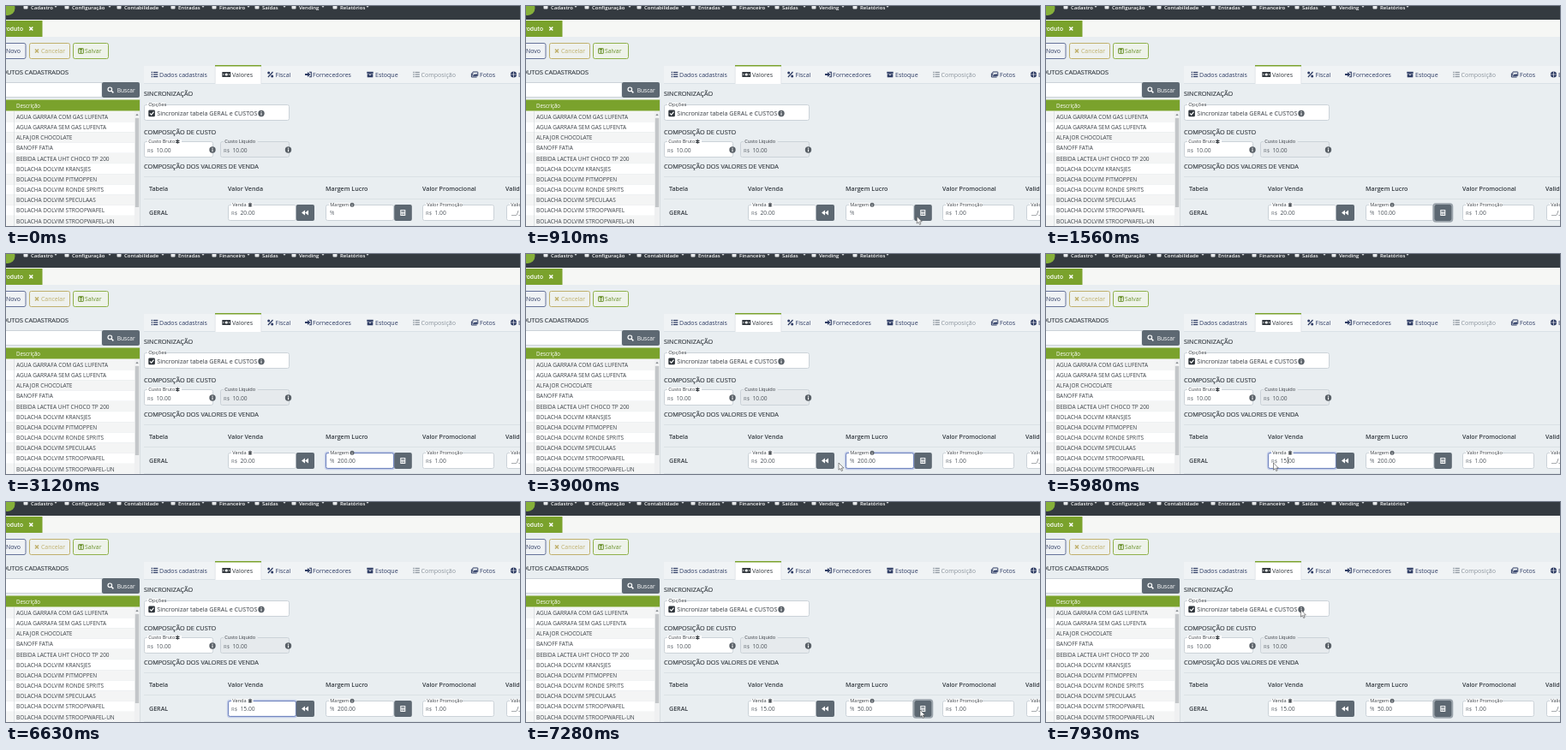
Write an HTML page that moves like this. It is 600x257 px and loops after 8000 ms.

```html
<!DOCTYPE html>
<html lang="pt">
<head>
<meta charset="utf-8">
<title>Cadastro de produto</title>
<style>
  html, body { margin: 0; width: 100%; height: 100%; overflow: hidden; background: #e9eef1; }
  svg { display: block; width: 100vw; height: 100vh; }
  text { font-family: "Open Sans", "Noto Sans", sans-serif; white-space: pre; }
</style>
</head>
<body>
<svg id="stage" viewBox="0 0 600 257"></svg>
<script>
const stage = document.getElementById('stage');
const INK = '#343a40', NAVY = '#2d3b63', GREEN = '#7aa22c', GOLD = '#bfb06c',
      SLATE = '#5d6872', EDGE = '#cbd2d8', WHITE = '#fff', MUTED = '#8b949d', NOTE = '#596067';

const rect = (x, y, w, h, fill, stroke = 'none', r = 0, extra = '') =>
  `<rect x="${x}" y="${y}" width="${w}" height="${h}" rx="${r}" fill="${fill}" stroke="${stroke}" ${extra}/>`;
const text = (x, y, size, str, fill = INK, weight = 400, extra = '') =>
  `<text x="${x}" y="${y}" font-size="${size}" font-weight="${weight}" fill="${fill}" ${extra}>${str}</text>`;
const path = (d, fill, stroke = 'none', width = 1) =>
  `<path d="${d}" fill="${fill}" stroke="${stroke}" stroke-width="${width}"/>`;
const line = (d, stroke, width = 1) => path(d, 'none', stroke, width);
const circle = (x, y, r, fill) => `<circle cx="${x}" cy="${y}" r="${r}" fill="${fill}"/>`;
const heading = (x, y, str, extra = '') =>
  text(x, y, 7.3, str, INK, 500, `stroke="${INK}" stroke-width=".15" ${extra}`);

// Icons are placed by their centre.
const icons = {
  list: (x, y, c) => [-2.5, 0, 2.5].map(d =>
    rect(x - 3.8, y + d - .7, 1.4, 1.4, c) + rect(x - 1.5, y + d - .6, 5.3, 1.2, c)).join(''),
  bill: (x, y, c) => rect(x - 5, y - 3, 10, 6, c, 'none', .6) + circle(x, y, 1.6, WHITE) +
    rect(x - 4, y - .6, 1.2, 1.2, WHITE) + rect(x + 2.8, y - .6, 1.2, 1.2, WHITE),
  percent: (x, y, c) => line(`M${x - 2.8} ${y + 3}L${x + 2.8} ${y - 3}`, c, 1.2) +
    circle(x - 2, y - 2, 1.5, c) + circle(x + 2, y + 2, 1.5, c),
  enter: (x, y, c) => path(`M${x - 4} ${y - 1}h3v-2l3.3 3l-3.3 3v-2h-3z`, c) +
    line(`M${x + 1} ${y - 2.8}h2.3v5.6h-2.3`, c, 1.1),
  box: (x, y, c) => rect(x - 3.7, y - 3.2, 7.4, 2, c) + rect(x - 3.3, y - .7, 6.6, 4, c) +
    rect(x - 1.2, y + .1, 2.4, .8, WHITE),
  photos: (x, y, c) => line(`M${x - 3.6} ${y - 1.5}v4.5h6.2`, c, 1) +
    rect(x - 2.2, y - 3, 6, 4.7, 'none', c, .4) + path(`M${x - 1.6} ${y + 1.2}l1.8 -2l1 1l1 -1.5l1.2 2.5z`, c),
  globe: (x, y, c) => circle(x, y, 3.6, c) +
    line(`M${x - 3.4} ${y}h6.8M${x} ${y - 3.4}v6.8`, WHITE, .6),
  cross: (x, y, c) => line(`M${x - 2} ${y - 2}l4 4M${x + 2} ${y - 2}l-4 4`, c, 1.5),
  disk: (x, y, c) => rect(x - 2.9, y - 2.9, 5.8, 5.8, 'none', c, .5) +
    rect(x - 1.8, y - 2.4, 3.4, 1.7, c) + circle(x, y + 1.1, 1.1, c),
  search: (x, y, c) => `<circle cx="${x - .7}" cy="${y - .7}" r="2.3" fill="none" stroke="${c}" stroke-width="1.2"/>` +
    line(`M${x + 1} ${y + 1}l2.4 2.4`, c, 1.5),
  info: (x, y, c, r = 3.7) => circle(x, y, r, c) +
    rect(x - r * .14, y - r * .15, r * .28, r * .75, WHITE) + circle(x, y - r * .5, r * .18, WHITE),
  star: (x, y, c) => line(`M${x} ${y - 2.5}v5M${x - 2.2} ${y - 1.25}l4.4 2.5M${x - 2.2} ${y + 1.25}l4.4 -2.5`, c, 1.1),
  rewind: (x, y, c) => path(`M${x} ${y - 3}v6l-4 -3zM${x + 4} ${y - 3}v6l-4 -3z`, c),
  calc: (x, y, c) => rect(x - 3, y - 3.5, 6, 7, c, 'none', .6) + rect(x - 2, y - 2.6, 4, 1.5, SLATE) +
    [0, 1, 2, 3, 4, 5].map(i => rect(x - 2 + i % 3 * 1.5, y + (i > 2 ? 1.5 : 0), 1, 1, SLATE)).join('')
};
const icon = (name, x, y, c = INK, r) => icons[name](x, y, c, r);

// The label sits in a gap of the upper border; `mark` drops that gap's width for a trailing icon.
const fieldLabel = (x, y, label, fill = WHITE, mark = 0, size = 5.6) =>
  rect(x + 4, y - 2, label.length * size * .52 + 2 + mark, 4.5, fill) + text(x + 5.3, y + 2, size, label);
const fieldBox = (x, y, w, fill = WHITE) => rect(x + .5, y + .5, w - 1, 18, fill, EDGE, 2);
const field = (x, y, w, label, fill, mark, size) =>
  fieldBox(x, y, w, fill) + fieldLabel(x, y, label, fill, mark, size);
const money = (x, y, value, id = '') => text(x, y, 6, 'R$', '#666d74') +
  text(x + 10.5, y, 6.7, value, '#495057', 400, id && `id="${id}"`);

function navbar() {
  const menus = [['Cadastro', 29, 58], ['Configuração', 77, 121], ['Contabilidade', 138, 183],
    ['Entradas', 201, 230], ['Financeiro', 249, 283], ['Saídas', 299, 325],
    ['Vending', 342, 370], ['Relatórios', 390, 422]];
  return rect(0, 0, 600, 16, INK) + menus.map(([name, x, caret]) =>
    rect(x - 8.5, -1, 5, 4.6, '#e6e8ea', 'none', 1) +
    text(x, 3.5, 6, name, WHITE, 600) +
    path(`M${caret - 1.5} 0h3l-1.5 2z`, '#cfd3d6')).join('');
}

function toolbar() {
  return rect(0, 16, 600, 20, '#f6f7f5') + rect(0, 17, 42.5, 19, GREEN) + circle(2, 2.5, 8.5, '#86b03a') +
    text(20, 29, 6.7, 'Produto', WHITE, 600, 'text-anchor="end"') + icon('cross', 29.3, 26.5, WHITE) +
    rect(-6, 43.5, 29, 18, '#eff2f5', '#66739a', 2) + text(0, 55, 7, 'Novo', NAVY) +
    rect(27.5, 43.5, 47, 18, '#eef1ee', GOLD, 2) + icon('cross', 36, 52.5, GOLD) +
    text(41, 55, 6.9, 'Cancelar', GOLD) +
    rect(78.5, 43.5, 41, 18, '#eef3ea', '#8fb04a', 2) + icon('disk', 87.5, 52.5, '#6d9330') +
    text(92, 55, 6.9, 'Salvar', '#6d9330');
}

function productList() {
  const cookie = 'BOLACHA DOLVIM ';
  const rows = ['AGUA GARRAFA COM GAS LUFENTA', 'AGUA GARRAFA SEM GAS LUFENTA', 'ALFAJOR CHOCOLATE',
    'BANOFF FATIA', 'BEBIDA LACTEA UHT CHOCO TP 200',
    ...['KRANSJES', 'PITMOPPEN', 'RONDE SPRITS', 'SPECULAAS', 'STROOPWAFEL', 'STROOPWAFEL-UN'].map(n => cookie + n)];
  return heading(73, 79.5, 'PRODUTOS CADASTRADOS', 'text-anchor="end"') +
    rect(-5, 89.5, 117, 17, WHITE, EDGE) + rect(112, 89, 44, 18, SLATE, 'none', 2) +
    icon('search', 122, 98, WHITE) + text(129.7, 100.7, 6.6, 'Buscar', WHITE) +
    rect(0, 109, 156, 148, WHITE) + rect(0, 109.5, 156, 13, GREEN) +
    text(12, 118.5, 6.2, 'Descrição', WHITE) +
    rows.map((name, i) => rect(0, 123.2 + i * 12.18, 150, 12.18, i % 2 ? WHITE : '#f4f5f5') +
      rect(0, 135.2 + i * 12.18, 150, .7, '#d9dee2') +
      text(12, 131.8 + i * 12.18, 6.5, name, '#3c4248')).join('') +
    rect(9, 123, .7, 134, '#d3d9db') +
    rect(150, 123, 6, 134, '#eff0f1') + path('M151.3 128h3.4l-1.7 -2.2z', '#858a8f') +
    rect(150.8, 131, 4.4, 104, '#c3c6c9') + rect(156, 109, .6, 148, EDGE);
}

function tabs() {
  const items = [['list', 173.5, 179, 'Dados cadastrais'], ['bill', 257.3, 264, 'Valores'],
    ['percent', 308.7, 314.5, 'Fiscal'], ['enter', 353, 358, 'Fornecedores'], ['box', 425, 431, 'Estoque'],
    ['list', 479, 484.5, 'Composição'], ['photos', 547, 553, 'Fotos'], ['globe', 592.5, 598, 'Ecommerce']];
  return rect(161, 70, 439, 20, '#f0f3f5') + rect(161, 90, 439, .8, '#d8dfe4') +
    rect(244, 69.5, 54, 21.5, WHITE) + line('M244.2 91V70M297.8 70V91', '#d8dfe4', .7) +
    rect(244, 69, 54, 1.5, GREEN) +
    items.map(([name, ix, x, label]) => {
      const c = label === 'Composição' ? MUTED : label === 'Valores' ? INK : NAVY;
      return icon(name, ix, 80, c) + text(x, 82.5, 7.05, label, c);
    }).join('');
}

function form() {
  return heading(161, 104.6, 'SINCRONIZAÇÃO') +
    field(161, 115, 170, 'Opções', WHITE, 0, 6) + rect(166.3, 121.5, 7.6, 7.8, '#2f353b', 'none', 1.3) +
    line('M168 125.3l1.7 1.8l2.8 -3.5', WHITE, 1.2) +
    text(176.3, 128.2, 7.1, 'Sincronizar tabela GERAL e CUSTOS') + icon('info', 298, 125.5, NOTE) +
    heading(161, 149.5, 'COMPOSIÇÃO DE CUSTO') +
    field(161, 158, 81, 'Custo Bruto', WHITE, 6) + icon('star', 200.3, 158.3) + money(165, 170.6, '10.00') +
    icon('info', 241, 168, NOTE) +
    field(250, 158, 81, 'Custo Líquido', '#e6eaed') + money(254, 170.6, '10.00') + icon('info', 329.5, 168, NOTE) +
    heading(161, 189.5, 'COMPOSIÇÃO DOS VALORES DE VENDA');
}

function priceTable() {
  const heads = [[167, 'Tabela'], [259, 'Valor Venda'], [373, 'Margem Lucro'],
    [486, 'Valor Promocional'], [583, 'Validade']];
  const ring = (id, x) => rect(x - .3, 231.2, 22.2, 20.6, 'none', '#9aa3ab', 3, `id="${id}" stroke-width="1.8"`);
  const focus = (id, x) => `<g id="${id}">` +
    rect(x, 232, 80, 19, 'none', '#c3cdE8', 2.5, 'stroke-width="2.4"') +
    rect(x + .5, 232.5, 79, 18, 'none', '#7488c0', 2) + '</g>';
  return [199, 225, 256].map(y => rect(161, y, 439, .7, '#d5dce1')).join('') +
    heads.map(([x, label]) => text(x, 215.6, 7.1, label, INK, 600)).join('') +
    text(167, 243.6, 7.1, 'GERAL', INK, 600) +
    fieldBox(259, 232, 80) + focus('saleFocus', 259) +
    fieldLabel(259, 232, 'Venda', WHITE, 9) + icon('star', 285, 232.2) +
    money(263, 243.5, '20.00', 'sale') + rect(281.9, 237, .7, 8, INK, 'none', 0, 'id="caret"') +
    rect(338.7, 232, 21.3, 19, SLATE, 'none', 2) + icon('rewind', 349, 241.5, WHITE) + ring('saleRing', 338.4) +
    fieldBox(373, 232, 80) + focus('marginFocus', 373) +
    fieldLabel(373, 232, 'Margem', WHITE, 9) + icon('info', 404, 232.3, NOTE, 2.5) +
    text(378, 243.5, 6.5, '%', '#666d74') + text(387, 243.5, 6.7, '', '#495057', 400, 'id="margin"') +
    rect(453.2, 232, 20.6, 19, SLATE, 'none', 2) + icon('calc', 463.3, 241.5, WHITE) + ring('marginRing', 452.5) +
    field(486, 232, 84, 'Valor Promoção') + money(490, 243.5, '1.00') +
    field(584, 232, 60, 'Validade') + text(590, 243.5, 6.7, '__/__', '#495057');
}

stage.innerHTML = rect(0, 0, 600, 257, '#e9eef1') + navbar() + toolbar() + productList() +
  tabs() + form() + priceTable() +
  `<g id="pointer">${path('M0 0v8.2l1.9 -1.7l1.3 3l1.4 -.6l-1.3 -2.9h2.6z', WHITE, '#444', .6)}</g>`;

const el = id => document.getElementById(id);
const [sale, margin, caret, pointer] = ['sale', 'margin', 'caret', 'pointer'].map(el);
const marks = ['saleFocus', 'saleRing', 'marginFocus', 'marginRing'].map(el);

// [start, value] pairs
const saleSteps = [[0, '20.00'], [4550, '30.00'], [5850, '1.00'], [5980, '15.00']];
const marginSteps = [[0, ''], [1300, '100.00'], [3120, '200.00'], [7280, '50.00']];
const focusSteps = [[0, ''], [1300, 'marginRing'], [2210, 'marginFocus'], [4550, 'saleRing'],
  [5460, 'saleFocus'], [7280, 'marginRing']];
// Pointer trips: each point is [time, x, y]
const trips = [
  [[650, 440, 254], [1040, 462, 243], [1430, 462, 243]],
  [[2210, 430, 246], [2340, 410, 243]],
  [[3640, 392, 244], [3900, 365, 244], [4160, 350, 243], [4550, 348, 242]],
  [[5330, 318, 244], [5460, 290, 244], [5980, 265.5, 244], [6110, 265.5, 246]],
  [[6890, 330, 247], [7150, 460, 243], [7410, 460, 243], [7930, 297.5, 126]]
];

const at = (steps, t) => steps.reduce((v, [start, value]) => t >= start ? value : v, '');

function pointerAt(t) {
  const trip = trips.find(p => t >= p[0][0] && t <= p[p.length - 1][0]);
  if (!trip) return null;
  const i = Math.max(1, trip.findIndex(p => p[0] >= t));
  const [a, b] = [trip[i - 1], trip[i]];
  const k = (t - a[0]) / (b[0] - a[0]);
  const e = k * k * (3 - 2 * k);
  return [a[1] + (b[1] - a[1]) * e, a[2] + (b[2] - a[2]) * e];
}

function draw(now) {
  const t = Math.floor(now % 8000 / 130) * 130;
  sale.textContent = at(saleSteps, t);
  margin.textContent = at(marginSteps, t);
  const focused = at(focusSteps, t);
  marks.forEach(m => m.style.display = m.id === focused ? '' : 'none');
  caret.style.display = t >= 5980 && t < 6500 ? '' : 'none';
  const spot = pointerAt(t);
  pointer.style.display = spot ? '' : 'none';
  if (spot) pointer.setAttribute('transform', `translate(${spot[0]} ${spot[1]})`);
}

const begin = performance.now();
function tick() {
  draw(performance.now() - begin);
  requestAnimationFrame(tick);
}
tick();
</script>
</body>
</html>
```
